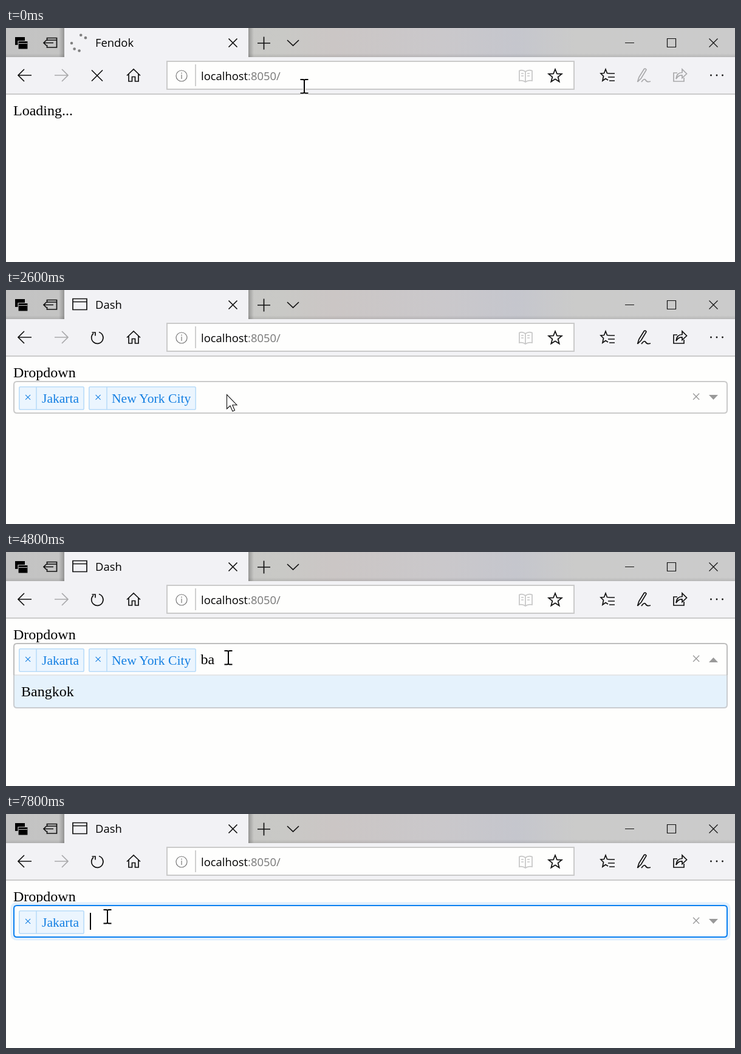
These frames come from a looping animation (1200 by 386 pixels, 8 s). An HTML page:

```html
<!DOCTYPE html>
<html lang="en">
<head>
<meta charset="utf-8">
<title>Dropdown demo</title>
<style>
  html, body { margin: 0; width: 100%; height: 100%; overflow: hidden; background: #fefefd; }
  svg { display: block; }
  text { white-space: pre; }
  .ui { font: 18.4px "Open Sans", sans-serif; }
  .page { font: 24px "Liberation Serif", serif; }
  .tag text { font-size: 21.6px; fill: #147fe2; }
  .tag path { fill: none; stroke: #b9dcf9; stroke-width: 1.6; }
  .tag rect { fill: #ebf5fe; stroke: #b9dcf9; stroke-width: 1.6; }
  .line { fill: none; stroke: #111; stroke-width: 1.7; }
  .thin { stroke-width: 1.2; }
  .off { stroke: #a9a9ab; }
</style>
</head>
<body>
<svg width="1200" height="386" viewBox="0 0 1200 386">
  <defs>
    <linearGradient id="bar">
      <stop offset="0" stop-color="#c3c3c3"/>
      <stop offset=".38" stop-color="#c9c9c6"/>
      <stop offset=".45" stop-color="#cbc6c5"/>
      <stop offset=".6" stop-color="#cac8cb"/>
      <stop offset=".7" stop-color="#c5c6cd"/>
      <stop offset=".78" stop-color="#cbcbca"/>
      <stop offset="1" stop-color="#cbcbcb"/>
    </linearGradient>
    <linearGradient id="shade">
      <stop offset="0" stop-color="#000" stop-opacity="0"/>
      <stop offset="1" stop-color="#000" stop-opacity=".25"/>
    </linearGradient>
    <linearGradient id="low" x2="0" y2="1">
      <stop offset="0" stop-color="#000" stop-opacity="0"/>
      <stop offset="1" stop-color="#000" stop-opacity=".1"/>
    </linearGradient>
    <path id="star" d="M0-11 L2.9-3.6 10.8-3.2 4.6 1.8 6.7 9.5 0 5.2 -6.7 9.5 -4.6 1.8 -10.8-3.2 -2.9-3.6Z"/>
  </defs>

  <!-- title bar -->
  <rect width="1200" height="48" fill="url(#bar)"/>
  <rect y="42" width="1200" height="6" fill="url(#low)"/>
  <rect x="87" width="9" height="48" fill="url(#shade)"/>
  <rect x="-408" width="9" height="48" fill="url(#shade)" transform="scale(-1 1)"/>
  <path d="M96 0H399V48H1200V108H0V48H96Z" fill="#f2f2f5"/>
  <path d="M15 15h16v13H15Z" fill="#000"/>
  <path d="M20 21.5h16V35H20Z" fill="#000" stroke="#c3c3c3" stroke-width="1.2"/>
  <path d="M21 25.5h14" stroke="#c3c3c3" stroke-width="1"/>
  <path class="line" d="M67.5 21V16.500H83.500V32H67.500V28M67.500 20H83.500M78 24.500H62M66.500 20 62 24.500 66.500 29"/>
  <g id="spinner" fill="#808080"></g>
  <path id="icon" class="line" stroke-width="1.5" d="M110 14.500H133V32.500H110ZM110 19.500H133"/>
  <text id="title" class="ui" x="147" y="31"></text>
  <path class="line" d="M366.500 17.500 380.500 31.500M380.500 17.500 366.500 31.500M414 25H435M424.500 14.500V35.500M463 20 472.500 29 482 20"/>
  <path class="line thin" d="M1019 24.500H1034M1088.500 17.500H1102.500V31.500H1088.500ZM1157.500 17.500 1171.500 31.500M1171.500 17.500 1157.500 31.500"/>

  <!-- toolbar -->
  <path d="M0 109H1200" stroke="#cbcbcb" stroke-width="2"/>
  <rect x="265" y="55" width="670" height="46" fill="#fefefd" stroke="#cacaca" stroke-width="2"/>
  <path class="line" d="M20 78H42M30 68 20 78 30 88"/>
  <path class="line off" d="M80 78H102M92 68 102 78 92 88"/>
  <path id="stop" class="line" d="M141 69.500 159 87.500M159 69.500 141 87.500"/>
  <path id="reload" class="line" d="M153 69.500A9.600 9.600 0 1 1 144 71.500M141.500 70H147V75.500"/>
  <path class="line" d="M199 78.500 210 68 221 78.500M202 76V88H207.500V80.500H212.500V88H218V76"/>
  <g class="line thin" style="stroke:#777">
    <circle cx="289" cy="79" r="9"/>
    <path d="M289 77V84M289 73.500V75.500"/>
  </g>
  <path d="M312 60V96" stroke="#c4c4c4" stroke-width="1.600"/>
  <text class="ui" x="321" y="86">localhost<tspan fill="#767676">:8050/</tspan></text>
  <path class="line" style="stroke:#c6c6c6" d="M855 72Q850 68 845 70.500V87Q850 85.500 855 89Q860 85.500 866 87V70.500Q860 68 855 72V89M848 75h4M848 79h4M858 75h4M858 79h4"/>
  <use href="#star" class="line" x="904" y="79"/>
  <path class="line" d="M1002 75H992M1002 81H991M1002 87H993M994 75 989.500 74.500 987 68 984.500 74.500 979 75 983.500 79.500 982 87 987 83.500 991 86"/>
  <g id="tools" class="line">
    <path d="M1039.500 89 1042 81 1050.500 67.500Q1053 66.500 1054 69L1045.500 83 1039.500 89M1046 89Q1051 82 1053 86T1061 88"/>
    <path d="M1105 74H1099V88H1116V82M1103 84Q1104 73.500 1113 73.500V68L1120.500 75.500 1113 82.500V78Q1107 77.500 1103 84Z"/>
  </g>
  <g fill="#111"><circle cx="1160.500" cy="78" r="1.400"/><circle cx="1170" cy="78" r="1.400"/><circle cx="1179.500" cy="78" r="1.400"/></g>

  <!-- page -->
  <g class="page">
    <text id="label" x="12" y="144"></text>
    <g id="control">
      <rect id="ring" x="10" y="148" width="1180" height="58" rx="7" fill="none" stroke="#e2f0fd" stroke-width="5"/>
      <g id="menu">
        <path d="M13 203H1187V252Q1187 257 1182 257H18Q13 257 13 252Z" fill="#e5f2fc" stroke="#c9ccd0" stroke-width="2"/>
        <text x="25" y="238">Bangkok</text>
      </g>
      <path id="box" fill="#fefefd" stroke-width="2"/>
      <path id="seam" d="M14 203H1186" stroke="#e4e6e8" stroke-width="2"/>
      <g class="tag">
        <rect x="21.800" y="159.800" width="106.400" height="37.400" rx="2"/>
        <path d="M50 160V197"/>
        <text x="30" y="184">×</text><text x="59" y="186">Jakarta</text>
      </g>
      <g id="city" class="tag">
        <rect x="136.800" y="159.800" width="175.400" height="37.400" rx="2"/>
        <path d="M166 160V197"/>
        <text x="145.500" y="184">×</text><text x="174" y="186">New York City</text>
      </g>
      <text id="typed" y="185"></text>
      <rect id="caret" y="163" width="2" height="28"/>
      <text x="1128.500" y="185" font-size="27" fill="#999">×</text>
      <path id="arrow" fill="#999"/>
    </g>
  </g>

  <g id="beam" fill="none">
    <path id="bar2" d="M-6.500-11H-2Q0-11 0-9Q0-11 2-11H6.500M0-9.500V9.500M-6.500 11.500H-2Q0 11.500 0 9.500Q0 11.500 2 11.500H6.500" stroke="#fff" stroke-width="4"/>
    <use href="#bar2" style="stroke:#000"/>
    <path d="M-6.500-11H-2Q0-11 0-9Q0-11 2-11H6.500M0-9.500V9.500M-6.500 11.500H-2Q0 11.500 0 9.500Q0 11.500 2 11.500H6.500" stroke="#000" stroke-width="2"/>
  </g>
  <path id="pointer" d="M.5.5V24L6 19 10 28 13.500 26.500 9.800 17.700H17Z" fill="#fff" stroke="#111" stroke-width="1.100"/>
</svg>

<script>
const LOOP = 8000, STEP = 200;
const $ = id => document.getElementById(id);
const show = (id, on) => $(id).style.display = on ? "" : "none";
const set = (id, name, value) => $(id).setAttribute(name, value);

// Each entry changes part of the state from its time on.
const events = [
  [0, { title: "Fendok", busy: true, ready: false, tools: false, open: false,
        focus: false, city: true, typed: "", caret: 0, beam: true }],
  [200, { title: "Dash" }],
  [400, { ready: true, busy: false }],
  [600, { tools: true }],
  [1400, { beam: false }],
  [3000, { open: true, beam: true, caret: 1 }],
  [3400, { caret: 0 }],
  [3600, { caret: 1 }],
  [4000, { caret: 0 }],
  [4200, { typed: "b", caret: 1 }],
  [4600, { typed: "ba", caret: .5 }],
  [4800, { caret: 0 }],
  [5000, { typed: "b", caret: 1 }],
  [5200, { typed: "" }],
  [5400, { open: false, focus: true }],
  [5600, { caret: 0 }],
  [5800, { caret: .75 }],
  [6000, { caret: 1 }],
  [6400, { caret: 0 }],
  [6600, { caret: 1, beam: false }],
  [7000, { caret: 0 }],
  [7200, { caret: 1, city: false, beam: true }],
  [7600, { caret: 0 }],
  [7800, { caret: 1 }]
];

// Mouse path: time, x, y
const path = [
  [0, 491, 96], [1000, 491, 96], [1400, 330, 148], [1600, 237, 178],
  [1800, 120, 188], [2000, 34, 180], [2200, 26, 185], [2400, 190, 150],
  [2600, 363, 172], [2800, 363, 172], [3000, 366, 174], [6200, 366, 174],
  [6600, 270, 174], [7000, 152, 177], [7200, 152, 177], [7400, 167, 169], [LOOP, 167, 169]
];

function mouse(t) {
  const i = path.findIndex(p => p[0] > t);
  const [a, b] = [path[i - 1], path[i]];
  const k = (t - a[0]) / (b[0] - a[0]);
  return [1, 2].map(n => Math.round(a[n] + (b[n] - a[n]) * k));
}

const dots = [11, 50, 175, 228, 270 - 85].map(() => {
  const dot = document.createElementNS("http://www.w3.org/2000/svg", "circle");
  dot.setAttribute("r", 2.3);
  return $("spinner").appendChild(dot);
});
const angles = [10, 50, 182, 220, 268];

function draw(now) {
  const t = Math.floor(now % LOOP / STEP) * STEP;
  const s = Object.assign({}, ...events.filter(e => e[0] <= t).map(e => e[1]));

  $("title").textContent = s.title;
  $("label").textContent = s.ready ? "Dropdown" : "Loading...";
  show("spinner", s.busy);
  show("stop", s.busy);
  show("icon", !s.busy);
  show("reload", !s.busy);
  dots.forEach((dot, i) => {
    const a = (angles[i] + t * .3) * Math.PI / 180;
    dot.setAttribute("cx", 121 + 13 * Math.sin(a));
    dot.setAttribute("cy", 24.5 - 13 * Math.cos(a));
  });
  $("tools").style.stroke = s.tools ? "" : "#a9a9ab";

  show("control", s.ready);
  show("ring", s.focus);
  show("menu", s.open);
  show("seam", s.open);
  show("city", s.city);
  set("box", "d", s.open
    ? "M13 203V156Q13 151 18 151H1182Q1187 151 1187 156V203"
    : "M18 151H1182Q1187 151 1187 156V198Q1187 203 1182 203H18Q13 203 13 198V156Q13 151 18 151Z");
  set("box", "stroke", s.focus ? "#0a80f0" : s.open ? "#bdbdbd" : "#cacaca");
  set("arrow", "d", s.open ? "M1157 182H1172L1164.5 174Z" : "M1157 173H1172L1164.5 181Z");

  const left = s.city ? 320.5 : 137;
  $("typed").textContent = s.typed;
  set("typed", "x", left);
  set("caret", "x", s.typed ? Math.round(left + $("typed").getComputedTextLength()) - 1 : Math.round(left + 1));
  set("caret", "opacity", s.caret);

  const [x, y] = mouse(t);
  show("beam", s.beam);
  show("pointer", !s.beam);
  set(s.beam ? "beam" : "pointer", "transform", `translate(${x} ${y})`);
}

const start = performance.now();
function tick() {
  draw(performance.now() - start);
  requestAnimationFrame(tick);
}
draw(0);
tick();
</script>
</body>
</html>
```
